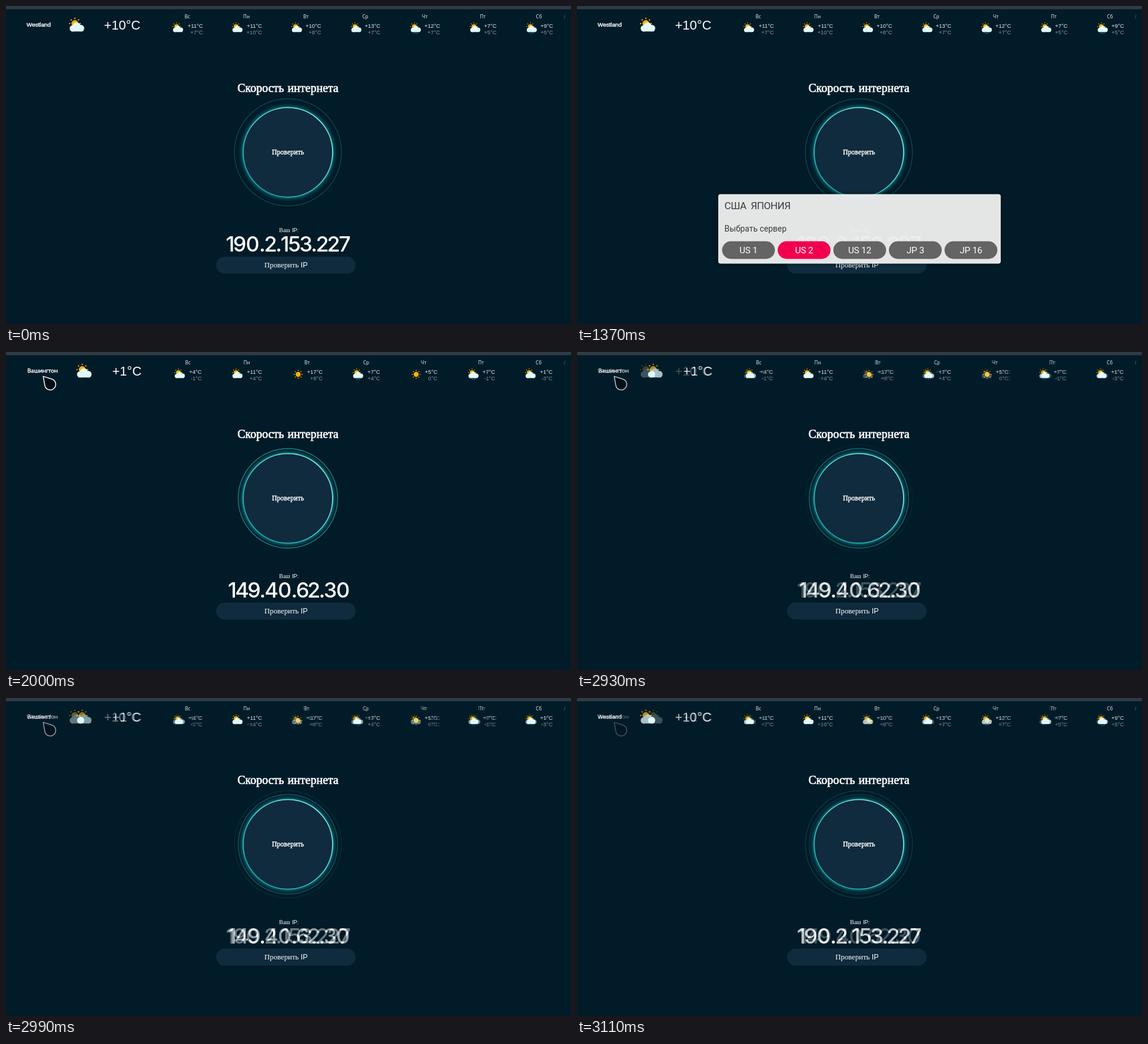
An HTML page with a canvas for the animation above (3140 ms loop, 960x540 px).

```html
<!DOCTYPE html>
<html lang="ru">
<head>
<meta charset="utf-8">
<title>Скорость интернета</title>
<style>
html, body { margin: 0; width: 100%; height: 100%; overflow: hidden; background: #011b28; }
canvas { display: block; width: 960px; height: 540px; }
</style>
</head>
<body>
<canvas id="stage" width="960" height="540"></canvas>
<script>
const W = 960, H = 540, LOOP = 3140, FADE = 2870, STEP = 30;
const SERIF = '"Liberation Serif", serif';
const SANS = '"Liberation Sans", sans-serif';
const NOTO = '"Noto Sans", sans-serif';
const ROBOTO = 'Roboto, sans-serif';
const PANEL = '#0f2b3d';
const CX = 479, CY = 248.5;

const WESTLAND = {
  city: 'Westland', cityFont: SANS, citySize: 9.9, cityX: 35, iconX: 107, now: '+10°C', nowX: 166.5,
  ip: '190.2.153.227', ipX: 375, ring: 91, ringColor: '#0f4450', glow: 0.5,
  // day, label centre, icon left, icon kind, text right edge, high, low
  days: [
    ['Вс', 308, 283, 'cloud', 334.5, '+11', '+7'],
    ['Пн', 408.5, 384, 'cloud', 435, '+11', '+10'],
    ['Вт', 509.5, 485, 'cloud', 535.5, '+10', '+8'],
    ['Ср', 610.5, 586, 'cloud', 636, '+13', '+7'],
    ['Чт', 711.5, 687, 'rain', 737.5, '+12', '+7'],
    ['Пт', 810, 788, 'cloud', 833.5, '+7', '+5'],
    ['Сб', 905.5, 884, 'rain', 929.5, '+9', '+5']
  ]
};
const WASHINGTON = {
  city: 'Вашингтон', cityFont: NOTO, citySize: 9.35, cityX: 36.3, iconX: 119.5, now: '+1°C', nowX: 180.5,
  ip: '149.40.62.30', ipX: 378.5, ring: 84.5, ringColor: '#1c7f82', glow: 0.55, pointer: true,
  days: [
    ['Вс', 309, 286, 'cloud', 332.5, '+4', '-1'],
    ['Пн', 409, 384, 'cloud', 435, '+11', '+4'],
    ['Вт', 511.5, 488, 'sun', 538, '+17', '+8'],
    ['Ср', 612, 589, 'rain', 635.5, '+7', '+4'],
    ['Чт', 709.5, 688.5, 'sun', 733, '+5', '0'],
    ['Пт', 807, 785, 'rain', 831, '+7', '-1'],
    ['Сб', 905, 882, 'cloud', 928.5, '+1', '-3']
  ]
};

let g;

function text(str, x, y, size, family, o = {}) {
  g.font = `${o.style || 'normal'} ${o.weight || 400} ${size}px ${family}`;
  g.textAlign = o.align || 'left';
  g.letterSpacing = (o.track || 0) + 'px';
  g.wordSpacing = (o.gap || 0) + 'px';
  g.fillStyle = g.strokeStyle = o.color || '#fff';
  g.fillText(str, x, y);
  if (o.bold) {
    g.lineWidth = o.bold;
    g.strokeText(str, x, y);
  }
}

function disc(x, y, r, color) {
  g.fillStyle = color;
  g.beginPath();
  g.arc(x, y, r, 0, 7);
  g.fill();
}

function ring(r, width, color) {
  g.strokeStyle = color;
  g.lineWidth = width;
  g.beginPath();
  g.arc(CX, CY, r, 0, 7);
  g.stroke();
}

function box(x, y, w, h, r, color) {
  g.fillStyle = color;
  g.beginPath();
  g.roundRect(x, y, w, h, r);
  g.fill();
}

function line(x1, y1, x2, y2) {
  g.beginPath();
  g.moveTo(x1, y1);
  g.lineTo(x2, y2);
  g.stroke();
}

function sun(x, y, r) {
  disc(x, y, r, '#ffb300');
  g.strokeStyle = '#ffb300';
  g.lineWidth = r * 0.32;
  for (let i = 0; i < 8; i++) {
    const c = Math.cos(i * Math.PI / 4), s = Math.sin(i * Math.PI / 4);
    line(x + c * r * 1.35, y + s * r * 1.35, x + c * r * 1.75, y + s * r * 1.75);
  }
}

function weather(kind, x, y, scale) {
  g.save();
  g.translate(x, y);
  g.scale(scale, scale);
  if (kind === 'sun') {
    sun(12.2, 14.5, 6.2);
  } else {
    sun(10, 10, 5.7);
    const white = '#e2f8fb';
    disc(13, 14.8, 6.8, white);
    disc(6.4, 18.3, 5.3, white);
    disc(20.3, 17.9, 5.6, white);
    box(2.5, 16.5, 22.5, 7, 3.5, white);
    if (kind === 'rain') {
      g.strokeStyle = '#35b4ea';
      g.lineWidth = 1.3;
      for (const [dx, dy] of [[8, 23], [13, 23.5], [18, 23], [11, 26], [16, 26]])
        line(dx + 1, dy - 0.5, dx - 0.6, dy + 2);
    }
  }
  g.restore();
}

function forecast(p) {
  text(p.city, p.cityX, 35, p.citySize, p.cityFont, { bold: 0.45 });
  weather('cloud', p.iconX, 19.8, 1);
  text(p.now, p.nowX, 40.4, 22, SANS);
  for (const [day, mid, left, kind, right, high, low] of p.days) {
    text(day, mid, 21, 8, NOTO, { align: 'center', color: '#e6eaec' });
    weather(kind, left, 28, 0.69);
    text(high + '°C', right, 36.7, 9.4, SANS, { align: 'right', color: '#eef1f2' });
    text(low + '°C', right, 48.2, 9.4, SANS, { align: 'right', color: '#8b979e' });
  }
  text('i', 948, 21, 8, NOTO, { style: 'italic', color: '#66757e' });
}

function dial(p, plain) {
  const glow = g.createRadialGradient(CX, CY, 76, CX, CY, 86);
  const power = plain ? 0.15 : p.glow;
  glow.addColorStop(0, `rgba(20,200,205,${power})`);
  glow.addColorStop(0.4, `rgba(15,170,178,${power * 0.36})`);
  glow.addColorStop(0.7, `rgba(12,150,160,${power * 0.1})`);
  glow.addColorStop(1, 'rgba(10,140,150,0)');
  disc(CX, CY, 86, glow);
  disc(CX, CY, 76, PANEL);
  if (plain) {
    ring(76.5, 2.4, '#43d9dc');
  } else {
    const edge = g.createLinearGradient(CX - 54, CY + 54, CX + 54, CY - 54);
    edge.addColorStop(0, '#1fa9ad');
    edge.addColorStop(1, '#86f6ee');
    ring(76, 1.7, edge);
    ring(p.ring, 1.4, p.ringColor);
  }
  text('Проверить', CX, 252, 12, SERIF, { align: 'center', bold: 0.4 });
}

// Proportional digits: narrow one, wide zero.
const ADVANCE = { 1: 12, 4: 21, 0: 24, 9: 20, 5: 20, '.': 9 };
function address(str, x) {
  for (const ch of str) {
    const w = ADVANCE[ch] || 19;
    text(ch, x + w / 2, 416.5, 36, 'Inter, sans-serif', { align: 'center', weight: 500 });
    x += w;
  }
}

// Teardrop: a circle with both tangents meeting at the tip.
function pointer() {
  const tipX = 63.2, tipY = 41.4, x = 75.2, y = 55, r = 9.4;
  const toTip = Math.atan2(tipY - y, tipX - x);
  const half = Math.acos(r / Math.hypot(tipX - x, tipY - y));
  g.beginPath();
  g.moveTo(tipX, tipY);
  g.arc(x, y, r, toTip + half, toTip - half);
  g.closePath();
  g.fillStyle = '#020d14';
  g.fill();
  g.strokeStyle = '#fff';
  g.lineWidth = 1.5;
  g.lineJoin = 'round';
  g.stroke();
}

function page(p, plain) {
  g.fillStyle = '#011b28';
  g.fillRect(0, 0, W, H);
  g.fillStyle = '#303b44';
  g.fillRect(0, 0, W, 5.5);
  forecast(p);
  text('Скорость интернета', CX, 146, 20, SERIF, { align: 'center', bold: 0.7, gap: 1 });
  dial(p, plain);
  text('Ваш', 464, 384, 10, SERIF);
  text('IP:', 486, 384, 9.6, ROBOTO);
  address(p.ip, p.ipX);
  box(357, 425.5, 237, 29, 14.5, PANEL);
  text('Проверить', 439, 444, 12.8, SERIF);
  text('IP', 500.7, 444, 12.6, SANS);
  if (p.pointer) pointer();
}

function globe(x, y, r, color) {
  g.strokeStyle = color;
  g.lineWidth = 1;
  for (const k of [1, 0.48]) {
    g.beginPath();
    g.ellipse(x, y, r * k, r, 0, 0, 7);
    g.stroke();
  }
  line(x, y - r, x, y + r);
  line(x - r, y, x + r, y);
  for (const s of [-1, 1]) line(x - r * 0.86, y + s * r * 0.5, x + r * 0.86, y + s * r * 0.5);
}

function dialog(top, height, title, lines, buttons) {
  g.save();
  g.shadowColor = 'rgba(0,0,0,.6)';
  g.shadowBlur = 6;
  box(240, top, 480, height, 4, 'rgba(247,248,248,.925)');
  g.restore();
  text(title, 250.5, top + 25, 17, ROBOTO, { color: '#3a3c3d', track: -0.4 });
  for (const [str, dy, x = 250.5] of lines)
    text(str, x, top + dy, 13.9, ROBOTO, { color: '#37393a' });
  const y = top + height - 38;
  buttons.forEach((label, i) => {
    const x = 246.5 + i * 94.5;
    box(x, y, 89.7, 30, 15, i === 1 ? '#f2004f' : '#646465');
    if (label) text(label, x + 44.9, y + 20.7, 15.4, ROBOTO, { align: 'center', track: -0.2 });
    else globe(x + 44.9, y + 15, 8, '#fff');
  });
}

function locations() {
  page(WESTLAND, true);
  dialog(259.5, 238, 'GAVUNDVPN UDP', [
    ['Выбор локации:', 63],
    ['NL - Нидерланды', 83],
    ['US|JP - США, Япония', 103],
    ['TCP - Перейти к TCP серверам', 143],
    ['USB - VPN подключение с конфигом на usb', 163],
    ['- Проверка IP + Инструкции', 185, 273]
  ], ['NL', 'US | JP', 'TCP', 'USB', '']);
  globe(260, 439, 7, '#37393a');
}

function servers() {
  page(WESTLAND);
  dialog(319.5, 118, 'США  ЯПОНИЯ', [['Выбрать сервер', 63]],
    ['US 1', 'US 2', 'US 12', 'JP 3', 'JP 16']);
}

function render(draw) {
  const layer = document.createElement('canvas');
  layer.width = W;
  layer.height = H;
  g = layer.getContext('2d');
  draw();
  return layer;
}

const home = render(() => page(WESTLAND));
const away = render(() => page(WASHINGTON));
const choose = render(locations);
const pick = render(servers);
const stage = document.getElementById('stage').getContext('2d');

function show() {
  const t = performance.now() % LOOP;
  stage.drawImage(t < 670 ? home : t < 1370 ? choose : t < 2000 ? pick : away, 0, 0);
  if (t >= FADE) {
    stage.globalAlpha = (Math.floor((t - FADE) / STEP) + 1) / 12;
    stage.drawImage(home, 0, 0);
    stage.globalAlpha = 1;
  }
  requestAnimationFrame(show);
}
show();
</script>
</body>
</html>
```
